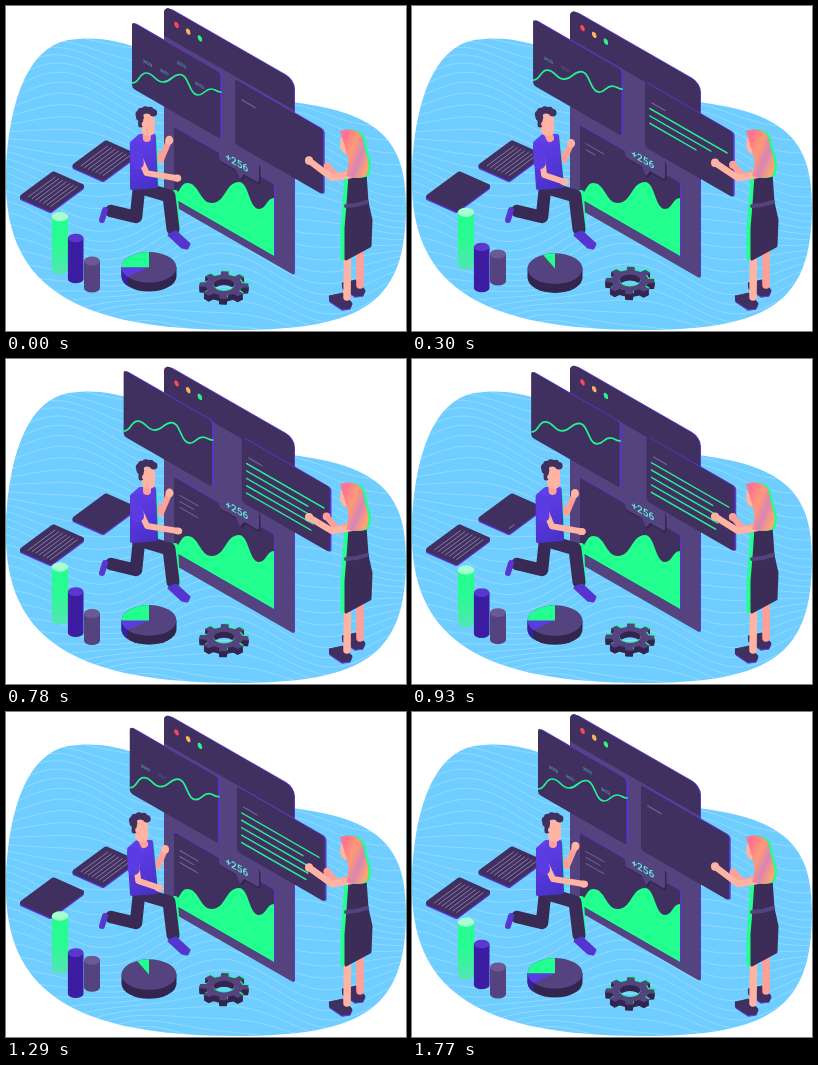
Animation, 400 px wide and 325 px high, one loop 1800 ms. Source, as an HTML page with a canvas:

```html
<!DOCTYPE html>
<html lang="en">
<head>
<meta charset="utf-8">
<title>Isometric dashboard</title>
<style>
html, body { margin: 0; width: 100%; height: 100%; overflow: hidden; background: #fff; }
canvas { display: block; width: 400px; height: 325px; }
</style>
</head>
<body>
<canvas id="stage"></canvas>
<script>
const W = 400, H = 325, LOOP = 1800, STEP = 30, TILT = 0.575, TAU = Math.PI * 2;
const DARK = '#40305f', MID = '#54437f', SHADE = '#33264e', EDGE = '#5a35d6';
const GREEN = '#22ff8e', SKIN = '#ffb3a3', BLUSH = '#ff9f98', SHIRT = '#5b3ce2';
const canvas = document.getElementById('stage');
const c = canvas.getContext('2d');
const ratio = window.devicePixelRatio || 1;
canvas.width = W * ratio;
canvas.height = H * ratio;

// Timing helpers
const clamp = v => Math.max(0, Math.min(1, v));
const seg = (t, a, b) => clamp((t - a) / (b - a));
const smooth = (t, a, b) => { const u = seg(t, a, b); return u * u * (3 - 2 * u); };
const easeOut = (t, a, b, p = 2) => 1 - Math.pow(1 - seg(t, a, b), p);

// Drawing helpers
function trace(pts) {
  c.beginPath();
  pts.forEach(p => c.lineTo(...p));
}
function fill(color, rule = 'nonzero') {
  c.fillStyle = color;
  c.fill(rule);
}
function stroke(width, color) {
  c.lineWidth = width;
  c.strokeStyle = color;
  c.lineCap = c.lineJoin = 'round';
  c.stroke();
}
function poly(pts, color, round = 1) {
  trace(pts);
  c.closePath();
  fill(color);
  stroke(round, color);
}
function line(pts, width, color) {
  trace(pts);
  stroke(width, color);
}
// Eases from crest to trough with level tangents
function waveThrough(pts) {
  trace([pts[0]]);
  pts.slice(1).forEach(([x, y], i) => {
    const [px, py] = pts[i], mid = (px + x) / 2;
    c.bezierCurveTo(mid, py, mid, y, x, y);
  });
}
function oval(x, y, rx, ry, color) {
  c.beginPath();
  c.ellipse(x, y, rx, ry, 0, 0, TAU);
  fill(color);
}
function box(x, y, w, h, r, color) {
  c.beginPath();
  c.roundRect(x, y, w, h, r);
  fill(color);
}
function fade(x0, y0, x1, y1, ...colors) {
  const g = c.createLinearGradient(x0, y0, x1, y1);
  colors.forEach((col, i) => g.addColorStop(i / (colors.length - 1), col));
  return g;
}
// Runs a drawing in the plane of the upright panels
function tilted(x, y, draw) {
  c.save();
  c.transform(1, TILT, 0, 1, x, y);
  draw();
  c.restore();
}
function panel(x, y, w, h) {
  tilted(x, y, () => {
    box(1.7, -0.9, w, h, 3, EDGE);
    box(0, 0, w, h, 3, DARK);
  });
}

function backdrop() {
  c.save();
  c.beginPath();
  c.moveTo(0, 165);
  c.bezierCurveTo(3, 95, 22, 42, 62, 34);
  c.bezierCurveTo(140, 22, 180, 82, 300, 98);
  c.bezierCurveTo(376, 110, 400, 138, 400, 200);
  c.bezierCurveTo(400, 295, 360, 324, 230, 324);
  c.bezierCurveTo(60, 324, -4, 275, 0, 165);
  fill('#6fceff');
  c.clip();
  for (let i = 0; i < 42; i++) {
    c.beginPath();
    for (let x = -4; x <= 404; x += 4) {
      c.lineTo(x, i * 9 - 20 + 15 * Math.sin(x / 42 + i * 0.13 + 2) +
        7 * Math.sin(x / 27 - i * 0.31));
    }
    stroke(0.55, 'rgba(255,255,255,.42)');
  }
  c.restore();
}

function tablet(x, y, count) {
  const at = (u, v) => [x + 35 * u + 32 * v, y - 26 * u + 14 * v];
  const shape = [at(0.06, 0.06), at(0.94, 0.06), at(0.94, 0.94), at(0.06, 0.94)];
  poly(shape.map(p => [p[0], p[1] + 1.5]), EDGE, 5);
  poly(shape, DARK, 5);
  for (let i = 0; i < 7; i++) {
    const part = clamp(count - (6 - i)), v = 0.18 + i * 0.115;
    if (part > 0.02) line([at(0.12, v), at(0.12 + 0.76 * part, v)], 0.7, '#a79bbf');
  }
}

function browser(e, q) {
  tilted(159, 5.5 * e, () => {
    box(1, -1, 129, 195, [8, 9, 2, 2], EDGE);
    box(-1, 0, 130, 195, [7, 8, 2, 2], MID);
    box(-1, 0, 130, 30, [7, 8, 0, 0], DARK);
    ['#ff4560', '#ffb45c', '#2df28c'].forEach((col, i) =>
      oval(11.5 + i * 11.7, 12.3, 2.3, 2.8, col));
  });
  tilted(168, 121 - 3 * e, () => {
    box(0, -0.6, 101, 73 + 3 * e, 2, EDGE);
    box(0, 0, 100, 72 + 3 * e, 2, DARK);
    [18, 14, 18].forEach((len, i) => {
      const part = easeOut(q, 210 + i * 50, 310 + i * 50), y = 15 + i * 6;
      if (part > 0) line([[6, y], [6 + len * part, y]], 1.1, '#77659b');
    });
  });
  waveThrough([[167, 189], [181, 177], [206, 197], [233, 176], [253, 203], [268, 192]]);
  c.lineTo(268, 250);
  c.lineTo(168, 192.5);
  fill(GREEN);
  tilted(213, 134 - 5.5 * e, () => {
    [[1.5, SHADE], [0, MID]].forEach(([d, col]) => {
      box(d, d, 40, 20, 3, col);
      poly([[17 + d, 19 + d], [25 + d, 19 + d], [21 + d, 26 + d]], col);
    });
    c.fillStyle = '#62f1df';
    c.font = '500 10px Roboto, "Liberation Sans", sans-serif';
    c.textAlign = 'center';
    c.fillText('+256', 17.8, 15.8);
  });
}

function graphPanel(e, t) {
  c.save();
  c.translate(-8.4 * e, -5 * e);
  panel(126, 16, 88.5, 66);
  const crests = [[140, 67], [157, 76], [174, 68.5], [192, 89]];
  waveThrough([[126.5, 77], ...crests, [205, 83], [215, 86]]);
  stroke(1.7, '#25f391');
  c.textAlign = 'left';
  c.font = '4px Roboto, "Liberation Sans", sans-serif';
  crests.forEach(([x, y], i) => {
    c.globalAlpha = 1 - smooth(t, 270 - i * 65, 450 - i * 65) +
      smooth(t, 1180 + i * 60, 1300 + i * 60);
    tilted(x - 3, y - 11, () => {
      c.fillStyle = '#62d9d4';
      c.fillText('202' + i, 0, 0);
    });
  });
  c.restore();
}

function listPanel(e, t) {
  const x = 229 + 6.8 * e, y = 73 + 5 * e;
  panel(x, y, 88, 65);
  tilted(x, y, () => {
    line([[7, 17], [20, 17]], 1.5, '#705f92');
    [77, 61, 64, 66, 64].forEach((len, i) => {
      const part = t < 900 ? easeOut(t, 90 + i * 70, 240 + i * 70)
        : 1 - smooth(t, 1690 - i * 95, 1770 - i * 95);
      const ly = 23.8 + i * 7.4;
      if (part > 0.01) line([[5, ly], [5 + len * part, ly]], 1.6, '#25f391');
    });
  });
}

function man(m) {
  const head = -7 * m, chest = -3 * m;
  // legs and shoes
  line([[133, 182], [130, 211], [105, 205]], 12.5, '#382a54');
  line([[99, 204], [96, 214]], 6, '#5936ce');
  line([[169, 187], [171, 226]], 6, GREEN);
  line([[136, 182], [163, 190], [167, 223]], 13, '#3a2c57');
  poly([[163, 229], [170, 226], [183, 238], [181, 242], [176, 241]], '#5634cf', 3);
  // far arm
  const fist = [163.5 - 4.5 * m, 134 + 3.5 * m];
  line([[146 + chest, 142], [155 + chest, 154], fist], 6, BLUSH);
  oval(...fist, 4, 4.4, SKIN);
  // body
  line([[150 + chest, 132], [152 + chest / 3, 178]], 2, GREEN);
  poly([[126 + chest, 137], [134 + chest, 130], [148 + chest, 130], [150, 180], [126, 182]],
    fade(122, 130, 152, 180, '#6440ee', '#4930c8'), 4);
  // head
  line([[141 + head, 122], [141 + chest, 132]], 8, BLUSH);
  box(136 + head, 107, 13, 23, 6, SKIN);
  for (let i = 0; i < 6; i++) {
    const a = Math.PI * (0.85 + i * 0.2);
    oval(141 + head + 7.5 * Math.cos(a), 109 + 5 * Math.sin(a), 3.8, 3.8, DARK);
  }
  line([[135 + head, 110], [135 + head, 119]], 5, DARK);
  oval(138 + head, 118, 2, 2.6, SKIN);
  // near arm
  const hand = [172 - 19.5 * m, 172 + 4 * m];
  line([[133 + chest, 150], [141 - 9 * m, 167 + 2 * m], hand], 6, SKIN);
  oval(...hand, 4.2, 3.6, SKIN);
  line([[130 + chest, 141], [132 + chest * 1.4, 157]], 12, SHIRT);
}

function cylinder(x, top, h, r, side, cap, ry = r * 0.56) {
  c.beginPath();
  c.ellipse(x, top + h, r, ry, 0, 0, Math.PI);
  c.lineTo(x - r, top);
  c.lineTo(x + r, top);
  fill(side);
  oval(x, top, r, ry, cap);
}

function pie(q, drop) {
  const x = 143, y = 261.3 + drop, rx = 27.5, ry = 15.3, depth = 9;
  const sweep = 128 - 102 * (smooth(q, 100, 300) - easeOut(q, 570, 780, 3));
  const angle = deg => (-90 - deg) * Math.PI / 180;
  cylinder(x, y, depth, rx, SHADE, MID, ry);
  const slice = (a, b, color) => {
    c.beginPath();
    c.moveTo(x, y);
    c.ellipse(x, y, rx, ry, 0, angle(a), angle(b), true);
    fill(color);
  };
  if (sweep > 90) {
    // outer wall under the violet slice
    c.beginPath();
    c.ellipse(x, y, rx, ry, 0, angle(90), angle(sweep), true);
    c.ellipse(x, y + depth, rx, ry, 0, angle(sweep), angle(90));
    fill('#3a1fa0');
    slice(90, sweep, SHIRT);
  }
  slice(0, Math.min(90, sweep), GREEN);
}

function gear(lift) {
  const x = 218, y = 279 - lift;
  const ring = (dx, dy) => {
    c.beginPath();
    for (let i = 0; i < 32; i++) {
      const a = (Math.floor(i / 4) + [-0.19, 0.19, 0.28, 0.72][i % 4]) * TAU / 8 + 0.04;
      const r = i % 4 < 2 ? 24.5 : 18.5;
      c.lineTo(x + dx + r * Math.cos(a), y + dy + r * 0.56 * Math.sin(a));
    }
    c.closePath();
    c.moveTo(x + 10.5, y + dy);
    c.ellipse(x, y + dy, 10.5, 5.9, 0, 0, TAU);
  };
  for (let d = 6; d > 0; d -= 0.5) {
    ring(0, d);
    fill(SHADE, 'evenodd');
  }
  ring(0.8, -1);
  fill(GREEN, 'evenodd');
  ring(0, 0);
  fill(MID, 'evenodd');
}

function shoe(x, y) {
  const sole = [[0, 2], [14, -1], [23, 9], [21, 14], [13, 15], [1, 7]];
  const at = d => sole.map(p => [x + p[0], y + p[1] + d]);
  poly(at(1.2), SHIRT);
  poly(at(0), DARK);
}

function woman(e) {
  shoe(336, 275);
  line([[354, 245], [354, 279]], 7.5, BLUSH);
  shoe(323, 288);
  line([[341.5, 250], [341, 291]], 7.5, SKIN);
  // far arm
  const far = [321.5 - e, 160.5 - 3 * e];
  line([[346, 166], [331, 170], far], 6, BLUSH);
  oval(...far, 3.8, 4, BLUSH);
  // dress, with the lit edge behind it
  const dress = [[344, 169], [359, 167], [361, 196], [365, 214], [364, 240],
    [340, 253], [340, 222], [342, 198]];
  poly(dress.map(([x, y]) => [x - 4, y]), GREEN, 3);
  poly(dress, '#3c2d58', 3);
  line([[340, 200], [350, 199], [361, 196]], 4, MID);
  // face and near arm
  oval(340, 138, 6, 10, SKIN);
  const near = [303, 154.5 + 3.8 * e];
  line([[345, 169], [326, 172], near], 6.5, SKIN);
  oval(...near, 4, 4.2, SKIN);
  // hair
  const hair = (dx, color) => {
    c.beginPath();
    c.moveTo(334 + dx, 125);
    c.bezierCurveTo(344 + dx, 121, 358 + dx, 124, 358 + dx, 139);
    c.bezierCurveTo(360 + dx, 150, 366 + dx, 158, 360 + dx, 170);
    c.quadraticCurveTo(350 + dx, 174, 340 + dx, 170);
    c.bezierCurveTo(346 + dx, 156, 339 + dx, 142, 334 + dx, 125);
    fill(color);
  };
  hair(2.5, GREEN);
  hair(0, fade(335, 142, 364, 154, '#ff7590', '#ff9a75', '#d985b4', '#ffa56e'));
}

function draw(t) {
  const q = t % 900;
  const e = t < 840 ? easeOut(t, 0, 840) : 1 - easeOut(t, 840, 1770);
  const lean = smooth(q, -50, 320) - smooth(q, 350, 780) + smooth(q, 850, 1220);
  const bob = easeOut(q, 0, 300) - smooth(q, 330, 870);
  const rise = (1 + Math.cos(TAU * (q - 510) / 900)) / 2;

  c.setTransform(ratio, 0, 0, ratio, 0, 0);
  c.fillStyle = '#fff';
  c.fillRect(0, 0, W, H);
  backdrop();
  tablet(65, 160.5, 7 * (1 - smooth(t, 380, 720) + smooth(t, 900, 1200)));
  tablet(12.5, 191.5, 7 * (1 - smooth(q, 20, 290) + smooth(q, 530, 660)));
  browser(e, q);
  graphPanel(e, t);
  listPanel(e, t);
  man(lean);

  const top = 211 - 8.5 * rise;
  cylinder(54, top, 53, 8.2, fade(0, top, 0, top + 56, GREEN, '#2bfa93', '#52e6b4'), '#a5ffd0');
  cylinder(69.7, 232 + 9 * bob, 41, 7.8, '#3c1ca0', '#5a38cf');
  cylinder(86, 255 - 7 * bob, 27, 8, MID, '#6a5995');
  pie(q, 1.3 * bob);
  gear(4.5 * bob);
  woman(e);
}

function tick(now) {
  draw(Math.floor(now % LOOP / STEP) * STEP);
  requestAnimationFrame(tick);
}
draw(0);
requestAnimationFrame(tick);
</script>
</body>
</html>
```
